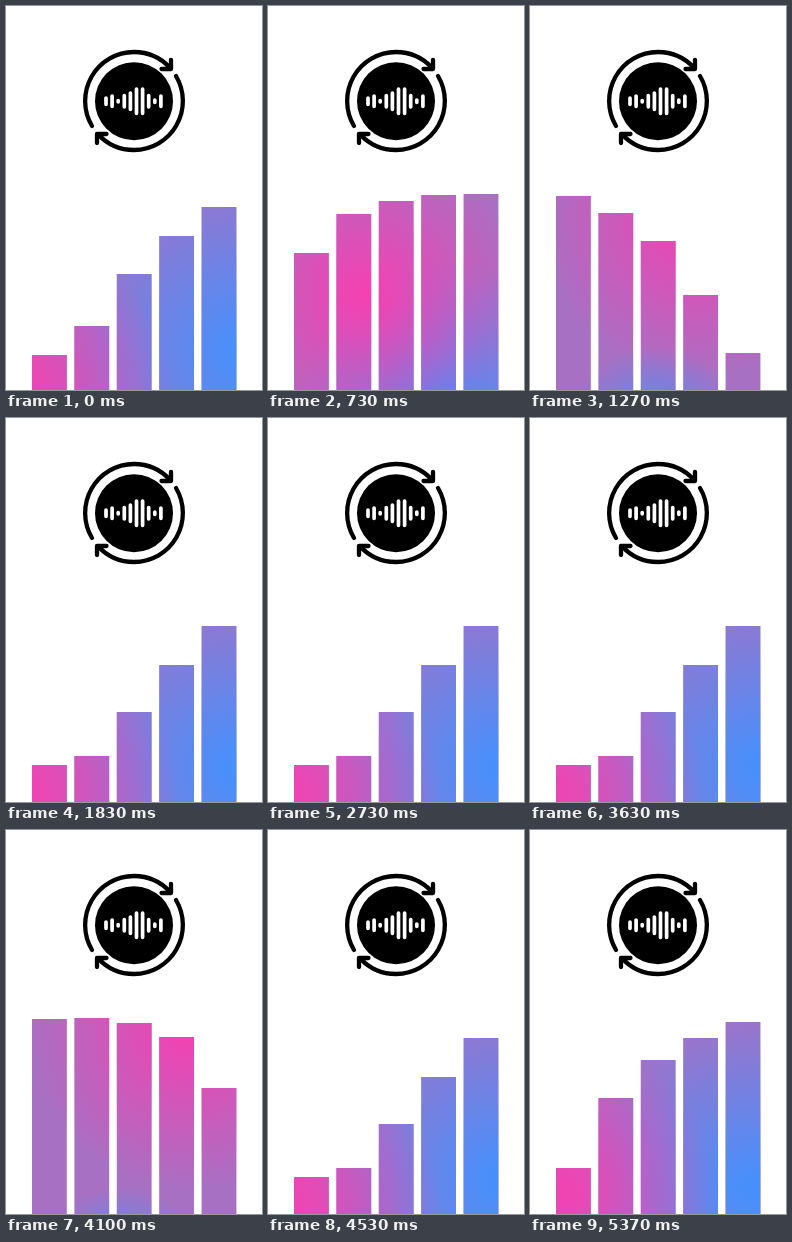
Write an HTML page with a canvas that moves like this. It is 256 px wide and 384 px high and loops after 5410 ms.

```html
<!DOCTYPE html>
<html lang="en">
<head>
<meta charset="utf-8">
<title>Sound bars</title>
<style>
  html, body { margin: 0; width: 100%; height: 100%; overflow: hidden; background: #fff; }
  canvas, svg { position: absolute; left: 0; top: 0; width: 256px; height: 384px; }
</style>
</head>
<body>
<canvas id="bars" width="256" height="384"></canvas>
<svg viewBox="0 0 256 384">
  <circle cx="128" cy="95.2" r="39"/>
  <g fill="none" stroke="#000" stroke-width="4.3" stroke-linecap="round" stroke-linejoin="round">
    <path d="M86 120A49 49 0 0 1 128 46A49 49 0 0 1 164 61.8M165 54V63H155.5"/>
    <path d="M170 70A49 49 0 0 1 128 144A49 49 0 0 1 92 128.2M91 137V128H100.5"/>
  </g>
  <path id="wave" stroke="#fff" stroke-width="3.7" stroke-linecap="round"/>
</svg>
<script>
const LOOP = 5410, FRAME = 100 / 3, LAST = 161, CYCLE = 27;
const WAVE = 28, FALL = 15, TOP = 187.4, LOW = 349.4;
const lags = [0, 3, 5, 7, 10];
const ctx = document.getElementById('bars').getContext('2d');

const waveHeights = [10, 14, 5, 15, 20, 28, 28, 15, 6, 14];
document.getElementById('wave').setAttribute('d', waveHeights.map((h, i) => {
  const reach = h / 2 - 1.85;
  return `M${100 + i * 6.1} ${95.2 - reach}v${2 * reach}`;
}).join(''));

// Cubic easing with flat ends; a and b are the handle positions in time.
function ease(x, a, b) {
  let lo = 0, hi = 1, s = 0.5;
  for (let i = 0; i < 24; i++) {
    s = (lo + hi) / 2;
    const r = 1 - s;
    if (3 * s * r * r * a + 3 * s * s * r * b + s * s * s < x) lo = s;
    else hi = s;
  }
  return s * s * (3 - 2 * s);
}

function barTop(step) {
  const u = (step % WAVE + WAVE) % WAVE;
  const drop = u < FALL
    ? ease(u / FALL, 0.777, 0.668)
    : 1 - ease((u - FALL) / (WAVE - FALL), 0.4, 0.22);
  return TOP + (LOW - TOP) * drop;
}

const mix = (a, b, k) => a + (b - a) * k;

function glow(x, y, radius, rgb) {
  const g = ctx.createRadialGradient(x, y, 0, x, y, radius);
  g.addColorStop(0, `rgba(${rgb},1)`);
  g.addColorStop(0.08, `rgba(${rgb},0.96)`);
  g.addColorStop(1, `rgba(${rgb},0)`);
  ctx.fillStyle = g;
  ctx.fillRect(0, 180, 256, 204);
}

function draw(n) {
  const swing = ((1 - Math.cos(2 * Math.PI * n / WAVE)) / 2) ** 0.7;
  ctx.clearRect(0, 0, 256, 384);
  ctx.save();
  ctx.beginPath();
  lags.forEach((lag, i) => {
    const y = Math.round(barTop(n + FALL - lag));
    ctx.rect(26 + 42.4 * i, y, 34.8, 384 - y);
  });
  ctx.clip();
  ctx.fillStyle = 'rgb(168,112,194)';
  ctx.fillRect(0, 180, 256, 204);
  // The two glows trade sides while the bars swing.
  glow(mix(240, 114, swing), mix(345, 442, swing), mix(205, 85, swing), '70,144,252');
  glow(mix(5, 183, swing), mix(385, 197, swing), 160, '242,66,178');
  ctx.restore();
}

const start = performance.now();
function tick() {
  const t = Math.floor((performance.now() - start) % LOOP / 10) * 10;
  draw(Math.min(LAST, Math.floor((t + 5) / FRAME)) % CYCLE);
  requestAnimationFrame(tick);
}
tick();
</script>
</body>
</html>
```
